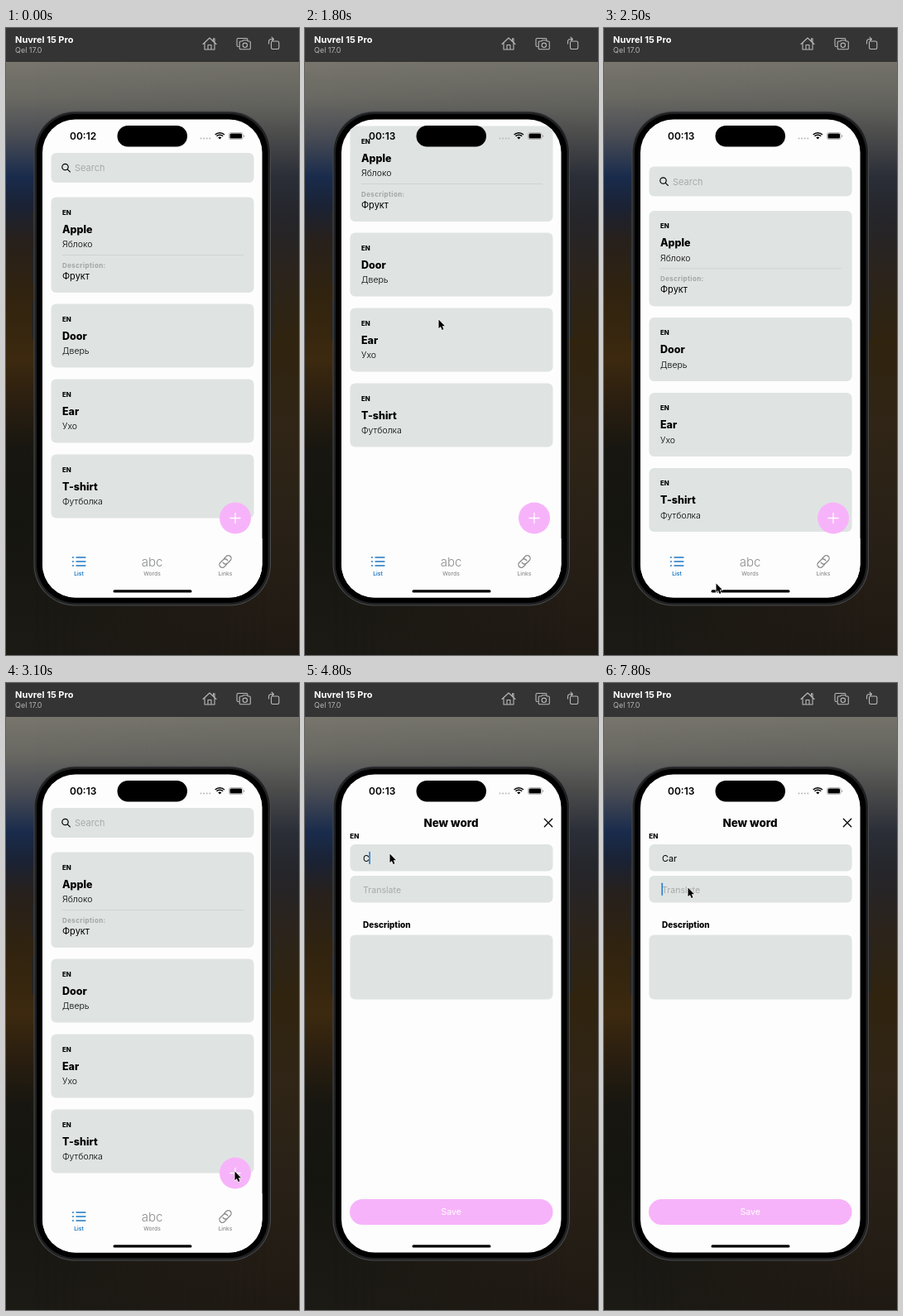
An HTML page with a canvas that plays this animation: 354x758 px, repeating every 8000 ms.

```html
<!DOCTYPE html>
<html lang="en">
<head>
<meta charset="utf-8">
<title>Word list</title>
<style>
html, body { margin: 0; width: 100%; height: 100%; overflow: hidden; background: #1c1914; }
canvas { display: block; width: 354px; height: 758px; }
</style>
</head>
<body>
<canvas id="stage"></canvas>
<script>
const W = 354, H = 758, LOOP = 8000, STEP = 100;
const CARD = '#dfe4e2', PINK = '#f7b3fa', BLUE = '#1c78c4', GRAY = '#8b8c8e', WHITE = '#fdfdfd';
const canvas = document.getElementById('stage');
const ratio = window.devicePixelRatio || 1;
canvas.width = W * ratio;
canvas.height = H * ratio;
const ctx = canvas.getContext('2d');
ctx.scale(ratio, ratio);

// Keyframes: [time, value, value...]
const pointerKeys = [
  [400, 116, 521], [500, 116, 521], [700, 148, 567], [800, 148, 567],
  [1100, 148, 605], [1200, 148, 605], [1400, 158, 433], [1600, 161, 372],
  [1800, 161, 352], [2000, 160, 400], [2200, 159, 478], [2500, 135, 671],
  [2650, 160, 668], [3000, 276, 590], [3600, 276, 590], [4100, 102, 206],
  [5700, 102, 206], [6100, 101, 247]
];
const scrollKeys = [
  [1200, 0], [1300, -17], [1400, -39.5], [1600, -74], [1800, -86],
  [2000, -81], [2200, -61], [2500, 16.5], [2700, 10], [2900, 2], [3100, 0]
];
const caretKeys = [[6300, 0], [6500, 1], [7100, 1], [7300, 0], [7500, 0], [7800, 1]];

function sample(keys, t) {
  if (t <= keys[0][0]) return keys[0].slice(1);
  for (let i = 1; i < keys.length; i++) {
    const a = keys[i - 1], b = keys[i];
    if (t <= b[0]) {
      const k = (t - a[0]) / (b[0] - a[0]);
      return a.slice(1).map((v, j) => v + (b[j + 1] - v) * k);
    }
  }
  return keys[keys.length - 1].slice(1);
}

function box(x, y, w, h, r, fill) {
  ctx.beginPath();
  ctx.roundRect(x, y, w, h, r);
  ctx.fillStyle = fill;
  ctx.fill();
}

function text(str, x, y, size, weight = 400, color = '#000', align = 'left', spacing = 0) {
  ctx.font = `${weight} ${size}px Inter, sans-serif`;
  ctx.letterSpacing = spacing + 'px';
  ctx.textAlign = align;
  ctx.fillStyle = color;
  ctx.fillText(str, x, y);
}

function stroke(path, color, width) {
  ctx.strokeStyle = color;
  ctx.lineWidth = width;
  ctx.lineCap = ctx.lineJoin = 'round';
  ctx.stroke(new Path2D(path));
}

function vertical(c, stops) {
  const g = c.createLinearGradient(0, 0, 0, H);
  for (const [y, color] of stops) g.addColorStop(y / H, color);
  return g;
}

const wallpaper = (() => {
  const layer = () => Object.assign(document.createElement('canvas'), { width: W, height: H });
  const base = layer(), right = layer();
  const b = base.getContext('2d'), r = right.getContext('2d');
  b.fillStyle = vertical(b, [
    [41, '#77756c'], [85, '#696862'], [130, '#4a4d54'], [180, '#192b4c'], [215, '#1a2234'],
    [255, '#27201c'], [320, '#30230f'], [400, '#3c290f'], [450, '#2b1f10'],
    [510, '#171610'], [600, '#151510'], [758, '#1c1a15']
  ]);
  b.fillRect(0, 0, W, H);
  r.fillStyle = vertical(r, [
    [41, '#747269'], [90, '#63635e'], [130, '#4b4b4b'], [180, '#2a2e37'], [230, '#25252a'],
    [300, '#2c241c'], [380, '#30240f'], [480, '#302516'], [600, '#292117'], [758, '#1f1913']
  ]);
  r.fillRect(0, 0, W, H);
  const mask = r.createLinearGradient(0, 0, W, 0);
  mask.addColorStop(0.1, 'rgba(0,0,0,0)');
  mask.addColorStop(0.9, '#000');
  r.globalCompositeOperation = 'destination-in';
  r.fillStyle = mask;
  r.fillRect(0, 0, W, H);
  b.drawImage(right, 0, 0);
  return base;
})();

function drawToolbar() {
  box(0, 0, W, 41, 0, '#343434');
  text('Nuvrel 15 Pro', 11, 18, 11, 700, '#fff');
  text('Qel 17.0', 11, 30, 9, 400, '#b4b4b4');
  const c = '#b9b9b9';
  stroke('M238 19.5L246 12L254 19.5M240 18V26H252V18M244 26V20.5H248V26M250.5 15V12.8H252V16.5', c, 1.1);
  stroke('M281 22.5H280.5Q279 22.5 279 21V14Q279 12.5 280.5 12.5H290.5Q292 12.5 292 14' +
    'M283.5 16H285.5L286.7 14.8H291.3L292.5 16H294Q295.3 16 295.3 17.3V24.5Q295.3 25.8 294 25.8H283.5Q282.2 25.8 282.2 24.5V17.3Q282.2 16 283.5 16Z' +
    'M291.5 20.8a2.7 2.7 0 1 1-5.4 0a2.7 2.7 0 1 1 5.4 0', c, 1.1);
  stroke('M321.5 16H328Q329.8 16 329.8 17.8V23.8Q329.8 25.5 328 25.5H322.2Q320.5 25.5 320.5 23.8V17' +
    'M317.5 19V16.5Q317.5 13.5 320.5 13.5H323M321 11.2L323.4 13.5L321 15.8', c, 1.1);
}

function drawPhone() {
  for (const [x, y, h] of [[31.5, 222, 18], [31.5, 268, 40], [31.5, 330, 46], [318.5, 305, 70]])
    box(x, y, 4, h, 1, '#242425');
  box(33.5, 100.5, 286.5, 598, 50, '#4b4b4d');
  box(34.5, 101.5, 284.5, 596, 49, '#202123');
  box(37, 104, 279.5, 591, 47, '#000');
}

function drawStatus(time) {
  text(time, 77, 135, 12, 600);
  box(134.5, 118, 84.5, 25.5, 12.75, '#000');
  for (let i = 0; i < 4; i++) box(234.5 + i * 3.6, 132.6, 2, 2, 1, '#b7b8b8');
  for (const r of [3.5, 6, 8.5]) {
    ctx.beginPath();
    ctx.arc(258.3, 134.6, r - 0.6, -Math.PI * 0.75, -Math.PI * 0.25);
    if (r === 3.5) {
      ctx.lineTo(258.3, 134.6);
      ctx.fillStyle = '#000';
      ctx.fill();
    } else {
      ctx.strokeStyle = '#000';
      ctx.lineWidth = 1.6;
      ctx.lineCap = 'butt';
      ctx.stroke();
    }
  }
  box(269.2, 126.2, 17.2, 8.6, 2.6, '#a5a6a6');
  box(269.9, 126.9, 15.8, 7.2, 2.1, WHITE);
  box(270.5, 127.4, 14.6, 6.2, 1.6, '#000');
  box(287, 129.2, 1.1, 2.7, 0.6, '#a5a6a6');
}

function drawCard(y, title, translation, note) {
  box(54.5, y, 245, note ? 115.5 : 77, 6, CARD);
  text('EN', 68, y + 21, 7.8, 800);
  text(title, 68, y + 43, 12.5, 800);
  text(translation, 68, y + 60.8, 10.5, 300);
  if (!note) return;
  box(68, y + 69.5, 219, 0.8, 0, '#c8cdcb');
  text('Description:', 68, y + 85, 8, 700, '#a0a5a4', 'left', 0.4);
  text(note, 68, y + 99.3, 11, 400);
}

function drawTabs() {
  for (const y of [640, 645, 650]) {
    box(80, y - 0.9, 1.9, 1.9, 0.95, BLUE);
    box(84.3, y - 0.7, 12.3, 1.4, 0.7, BLUE);
  }
  text('abc', 176.5, 651, 15, 300, GRAY, 'center');
  ctx.save();
  ctx.translate(265, 645);
  ctx.rotate(-Math.PI / 4);
  stroke('M-1.5 3.6H-5.2A3.5 3.5 0 0 1 -5.2 -3.4H-0.5A3.5 3.5 0 0 1 2.8 1.2' +
    'M1.5 -3.6H5.2A3.5 3.5 0 0 1 5.2 3.4H0.5A3.5 3.5 0 0 1 -2.8 -1.2', GRAY, 1.3);
  ctx.restore();
  text('List', 88, 662.3, 6.7, 600, BLUE, 'center');
  text('Words', 176.5, 662.3, 6.7, 500, GRAY, 'center');
  text('Links', 265, 662.3, 6.7, 500, GRAY, 'center');
}

function drawList(scroll) {
  box(54.5, 151 + scroll, 245, 36, 6, CARD);
  const y = 169 + scroll;
  stroke(`M75.2 ${y - 1}a3.7 3.7 0 1 1 -7.4 0a3.7 3.7 0 1 1 7.4 0M74.3 ${y + 1.8}L77.4 ${y + 4.9}`, '#000', 1.2);
  text('Search', 83, y + 4.2, 11, 400, '#a6abaa');
  drawCard(204.5 + scroll, 'Apple', 'Яблоко', 'Фрукт');
  drawCard(333.5 + scroll, 'Door', 'Дверь');
  drawCard(424.5 + scroll, 'Ear', 'Ухо');
  drawCard(515.5 + scroll, 'T-shirt', 'Футболка');
  box(44, 617, 266, 72, 0, WHITE);
  box(258, 573.5, 38, 38, 19, PINK);
  stroke('M271 592.5H283M277 586.5V598.5', '#fff', 1.3);
  drawTabs();
}

function drawCaret(x, y, alpha) {
  ctx.globalAlpha = alpha;
  box(x - 0.8, y, 1.7, 15.5, 0.8, '#2f80cf');
  ctx.globalAlpha = 1;
}

function drawForm(t) {
  text('New word', 176.5, 174, 13.4, 800, '#000', 'center');
  stroke('M289.3 164.3L298.7 173.7M298.7 164.3L289.3 173.7', '#000', 1.3);
  text('EN', 54.3, 188, 8, 800);
  box(54.5, 195, 245, 32.5, 6, CARD);
  box(54.5, 233, 245, 32.5, 6, CARD);
  text('Description', 70, 296, 10, 800);
  box(54.5, 304.5, 245, 78, 6, CARD);
  box(54, 624, 245.5, 31, 15.5, PINK);
  text('Save', 176.7, 643.4, 10.6, 400, '#fff', 'center');

  const typed = 'Car'.slice(0, [4800, 5100, 5300].filter(at => t >= at).length);
  text('Translate', 70, 253.6, 10.6, 400, '#a6abaa');
  text(typed || 'Word', 70, 215.5, 10.8, 400, typed ? '#000' : '#a6abaa');
  if (t >= 4300 && t < 6000) drawCaret(70.2 + ctx.measureText(typed).width, 203.8, 1);
  drawCaret(70.2, 241.5, sample(caretKeys, t)[0]);
}

function drawPointer(t) {
  if (t < 400) return;
  const [x, y] = sample(pointerKeys, t);
  ctx.save();
  ctx.translate(x, y);
  const arrow = 'M0.5 0.5V11.2L2.9 9L4.6 13L6.5 12.2L4.8 8.3H8Z';
  stroke(arrow, '#fff', 1.4);
  ctx.fillStyle = '#000';
  ctx.fill(new Path2D(arrow));
  ctx.restore();
}

function draw(t) {
  ctx.drawImage(wallpaper, 0, 0, W, H);
  drawToolbar();
  drawPhone();
  ctx.save();
  ctx.beginPath();
  ctx.roundRect(44, 110.5, 265.5, 578, 40);
  ctx.clip();
  ctx.fillStyle = WHITE;
  ctx.fillRect(44, 110, 266, 579);
  if (t < 3400) drawList(sample(scrollKeys, t)[0]);
  else drawForm(t);
  drawStatus(t < 1000 ? '00:12' : '00:13');
  box(129.5, 679.3, 95, 3.3, 1.65, '#000');
  ctx.restore();
  drawPointer(t);
}

function tick() {
  const t = performance.now() % LOOP;
  draw(Math.floor(t / STEP) * STEP);
  requestAnimationFrame(tick);
}
tick();
</script>
</body>
</html>
```
